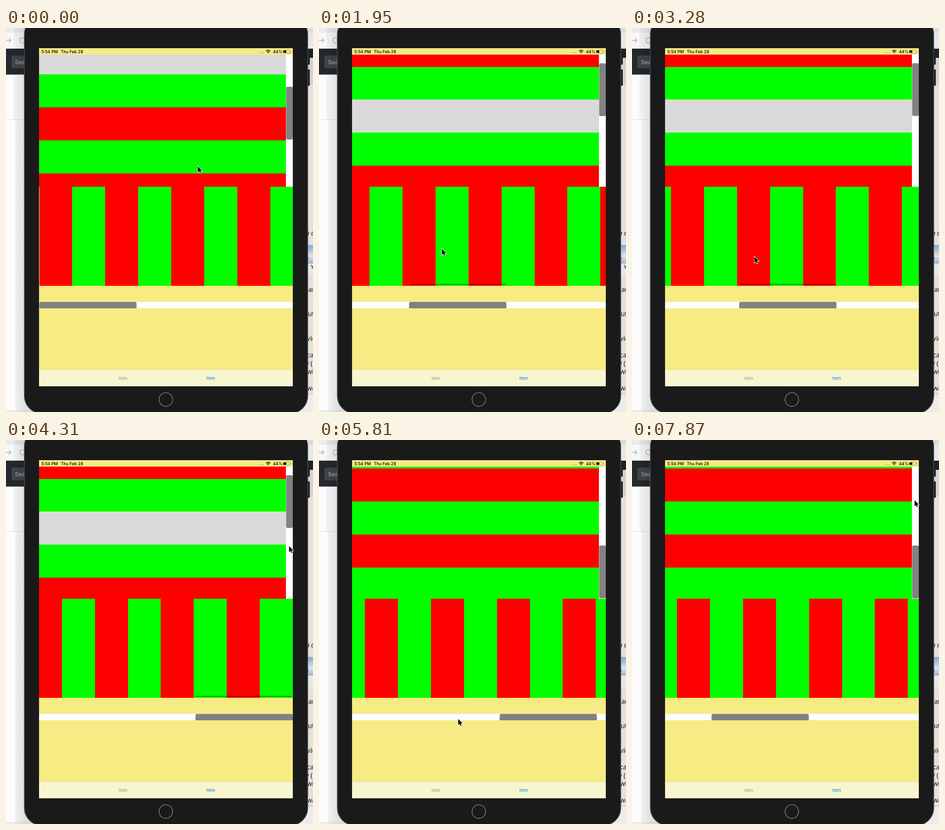
Recreate the animation shown at these times as an HTML page. Size 669 px wide and 837 px high, loop 8000 ms.

```html
<!DOCTYPE html>
<html lang="en">
<head>
<meta charset="utf-8">
<title>Two scrolling lists</title>
<style>
html, body { margin: 0; width: 100%; height: 100%; overflow: hidden; background: #fcfcfc; }
svg { display: block; width: 669px; height: 837px; }
.ui { font: 500 9px Inter, Roboto, sans-serif; }
.tabs { font: 9.3px Inter, Roboto, sans-serif; text-anchor: middle; }
.page { font: 14px "Noto Sans", "Open Sans", sans-serif; fill: #151515; }
.crisp { shape-rendering: crispEdges; }
</style>
</head>
<body>
<svg viewBox="0 0 669 837" xmlns="http://www.w3.org/2000/svg">
  <defs>
    <linearGradient id="shade" gradientUnits="userSpaceOnUse" x1="15" x2="40">
      <stop offset="0" stop-color="#000" stop-opacity=".03"/>
      <stop offset="1" stop-color="#000" stop-opacity=".11"/>
    </linearGradient>
    <linearGradient id="sky" x2="0" y2="1">
      <stop offset="0" stop-color="#84a6d0"/>
      <stop offset=".42" stop-color="#c3d0e2"/>
      <stop offset=".6" stop-color="#dfe4ec"/>
      <stop offset="1" stop-color="#9fb4d0"/>
    </linearGradient>
    <clipPath id="rowClip"><rect x="72" y="58" width="538" height="289"/></clipPath>
    <clipPath id="colClip"><rect x="72" y="346" width="553" height="216"/></clipPath>
    <clipPath id="barClip"><rect x="72" y="597" width="553" height="14"/></clipPath>
  </defs>

  <!-- page behind, left -->
  <rect width="50" height="10.5" fill="#e9ebee"/>
  <rect y="10.5" width="50" height="34.5" fill="#f8f8f8"/>
  <path d="M0 27h11M6 22l5 5-5 5" fill="none" stroke="#aaa" stroke-width="1.3"/>
  <path d="M40 23.5a5.5 5.5 0 1 0 1 5" fill="none" stroke="#aaa" stroke-width="1.3"/>
  <rect y="45" width="50" height="56.5" fill="#24292e"/>
  <rect x="12" y="60" width="40" height="28" rx="3" fill="#40454a"/>
  <text x="19.5" y="78.5" font-family="Inter, sans-serif" font-size="12.3" fill="#b5b7b9">Sea</text>
  <path d="M0 199.5h40" stroke="#e1e1e1"/>
  <path d="M16 0h64v837H20V199h-4z" fill="url(#shade)"/>
  <path d="M0 834.5h80" stroke="#c5c5c5"/>

  <!-- page behind, right -->
  <rect x="610" width="59" height="837" fill="#e6dfdb"/>
  <rect x="640" width="29" height="10.5" fill="#d9dbde"/>
  <rect x="640" y="10.5" width="29" height="34.5" fill="#e8e8e8"/>
  <rect x="640" y="45" width="29" height="20" fill="#1e2226"/>
  <rect x="640" y="65" width="29" height="59" fill="#d4d1cf"/>
  <rect x="640" y="473" width="29" height="40" fill="url(#sky)"/>
  <rect x="640" y="513" width="29" height="26" fill="#e9e7e7"/>
  <path d="M640 512.5h29" stroke="#6d9cd0"/>
  <g class="page">
    <text x="653" y="452" font-style="italic">n d</text>
    <text x="653" y="508" fill="#42658f">y</text>
    <text id="blink" x="664" y="525" font-size="12">Y</text>
    <text x="659" y="575">an</text>
    <text x="658" y="628">ut</text>
    <text x="655" y="682" font-weight="700" fill="#2c6a16">vie</text>
    <text x="656" y="718">ca</text>
    <text x="653" y="736">y (r</text>
    <text x="656" y="754">wi</text>
    <text x="656" y="790">wa</text>
  </g>
  <path d="M610 798.5h59" stroke="#bbb"/>
  <rect x="610" y="799" width="59" height="38" fill="#ececec"/>

  <!-- tablet -->
  <rect x="654" y="62" width="8" height="18" rx="2" fill="#1c1f22"/>
  <rect x="654" y="90" width="8" height="36" rx="2" fill="#1c1f22"/>
  <rect x="40" y="-24" width="617.5" height="864" rx="38" fill="#1a1a1a" stroke="#484b50" stroke-width="1.6"/>
  <circle cx="348.3" cy="809.8" r="14.8" fill="none" stroke="#a2a2a2" stroke-width="1.1"/>
  <rect class="crisp" x="72" y="44" width="553" height="737" fill="#f7eb84"/>
  <g class="ui">
    <text x="77" y="55">5:54 PM</text>
    <text x="119.5" y="55">Thu Feb 28</text>
    <text x="581.7" y="55">44%</text>
  </g>
  <path d="M550.3 54h12" stroke="#9c9458" stroke-width="1.5" stroke-dasharray="1.5 1.8"/>
  <path d="M566.6 50.2q4.7-3.9 9.4 0M568.5 52.4q2.8-2.4 5.6 0" fill="none" stroke="#111" stroke-width="1.5"/>
  <path d="M569.8 53.8q1.5-1.2 3 0l-1.5 1.7z"/>
  <rect x="603.5" y="48" width="15.5" height="7.2" rx="1.8" fill="none" stroke="#8d8756" stroke-width=".8"/>
  <rect x="604.6" y="49.1" width="6.2" height="5" rx=".8"/>
  <path d="M620.4 50.2v2.8" stroke="#8d8756" stroke-width="1.1"/>

  <!-- vertical list -->
  <rect x="610" y="58" width="15" height="289" fill="#fff"/>
  <g class="crisp" clip-path="url(#rowClip)"><g id="rows"></g></g>
  <rect id="vThumb" x="610.5" width="14.5" height="115" rx="3" fill="#828282"/>

  <!-- horizontal list -->
  <g class="crisp" clip-path="url(#colClip)"><g id="cols"></g></g>
  <rect id="hint" y="557.8" width="210" height="2" rx="1"/>
  <g clip-path="url(#barClip)">
    <rect x="72" y="597" width="553" height="14" fill="#fdfdfd"/>
    <rect id="hThumb" y="597" width="212" height="22" rx="4" fill="#828282"/>
  </g>

  <!-- tab bar -->
  <rect class="crisp" x="72" y="745" width="553" height="36" fill="#f8f6ce"/>
  <path d="M72 745h553" stroke="#dcd9b4" stroke-width=".8"/>
  <g class="tabs">
    <text x="254.7" y="766.6" fill="#929292">Item</text>
    <text x="446.2" y="766.6" fill="#0b7cf5">Item</text>
  </g>

  <path id="cursor" d="M.8 1.2v13.3l3-2.8 2 4.6 2.2-.9-2-4.5h4.1z" stroke="#fff" stroke-width="1.8" paint-order="stroke"/>
</svg>
<script>
const LOOP = 8000, STEP = 148.4, CELL = 71.9, LEFT = 72.5, TOP = 58.5;
const $ = id => document.getElementById(id);

// Travels by dist from step a to step b; a power above 1 slows towards the end.
function move(n, a, b, dist, power = 1) {
  const p = Math.min(1, Math.max(0, (n - a) / (b - a)));
  return dist * (1 - (1 - p) ** power);
}

// Flick down, then a drag of the scroll bar.
const scrollY = n => 173.2 - move(n, 0, 14, 127.4, 3.13) + move(n, 29, 34, 382);

// Two drags, a flick to the end, then the scroll bar is pulled back.
const scrollX = n => move(n, 4, 13, 322, 1.2) + move(n, 19, 22, 97)
  + move(n, 22, 28, 466.5, 2.5) - move(n, 38, 50.4, 623.4);

// Pointer stops: step, x, y.
const stops = [[0, 417, 300], [4, 425, 455], [7, 309, 457], [13, 267, 480], [19, 345, 495], [22, 266, 497],
  [29, 616, 230], [34, 616, 383], [37, 322, 607], [38, 322, 607], [50.4, 82, 605], [53, 615, 130]];

function pointer(n) {
  let [, x, y] = stops[0];
  for (let i = 1; i < stops.length; i++) {
    const [a, x0, y0] = stops[i - 1], [b, x1, y1] = stops[i];
    x += move(n, a, b, x1 - x0);
    y += move(n, a, b, y1 - y0);
  }
  return `translate(${x} ${y})`;
}

function set(id, attrs) {
  for (const name in attrs) $(id).setAttribute(name, attrs[name]);
}

const stripe = i => i % 2 ? "#0f0" : "#f00";
const cell = (x, y, w, h, fill) => `<rect x="${x}" y="${y}" width="${w}" height="${h}" fill="${fill}"/>`;
const repeat = (length, make) => Array.from({ length }, (_, i) => make(i)).join("");

$("rows").innerHTML = repeat(10, i => cell(72, TOP + i * CELL, 538, CELL, i === 2 ? "#d9d9d9" : stripe(i)));
$("cols").innerHTML = repeat(20, i => cell(LEFT + i * CELL, 346, CELL, 216, stripe(i)));

function draw(time) {
  const n = Math.floor(time % LOOP / STEP), v = scrollY(n), h = scrollX(n);
  set("rows", { transform: `translate(0 ${-v})` });
  set("cols", { transform: `translate(${-h} 0)` });
  set("vThumb", { y: TOP + v * 0.401 });
  set("hThumb", { x: LEFT + h * 0.3845 });
  set("hint", { x: 74.8 + h * 0.382, opacity: n > 4 && n < 31 ? 0.4 : 0 });
  set("cursor", { transform: pointer(n) });
  set("blink", { opacity: n < 18 || (n > 42 && n < 50) ? 1 : 0 });
}

let start;
function tick(now) {
  start ??= now;
  draw(now - start);
  requestAnimationFrame(tick);
}
draw(0);
requestAnimationFrame(tick);
</script>
</body>
</html>
```
